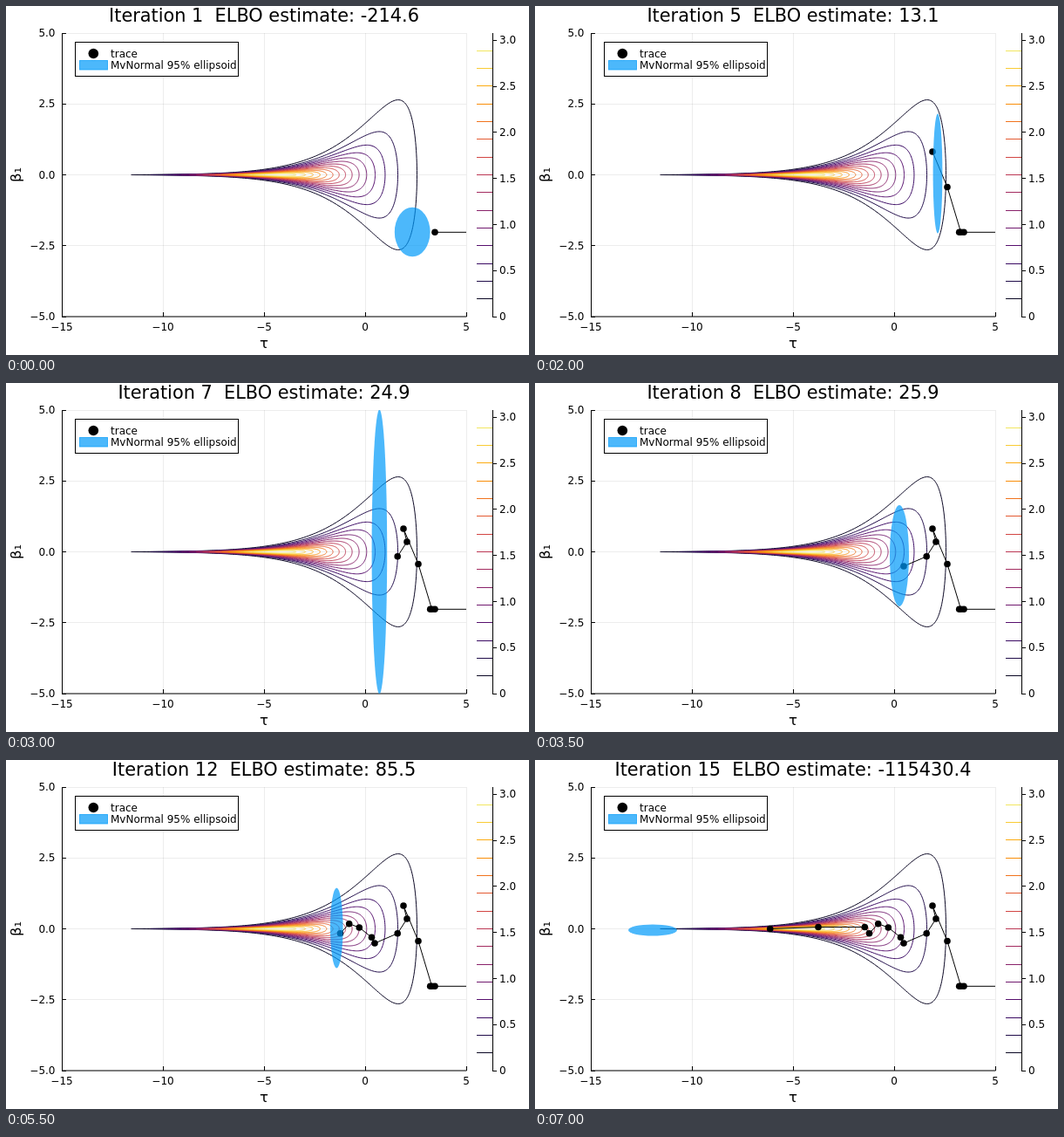
These frames come from a looping animation (600x400 px, 7.5 s). An HTML page with a canvas:

```html
<!DOCTYPE html>
<html lang="en">
<head>
<meta charset="utf-8">
<style>
  html, body { margin: 0; width: 100%; height: 100%; overflow: hidden; background: #fff; }
  canvas { display: block; width: 600px; height: 400px; }
</style>
</head>
<body>
<canvas id="stage" width="600" height="400"></canvas>
<script>
const ctx = document.getElementById('stage').getContext('2d');
const STEP = 500;
const BOX = { l: 64, t: 31, r: 528, b: 356 };
const BLUE = 'rgba(0,154,249,0.7)';
const INFERNO = ['#0b0724', '#210c4a', '#3a0963', '#57106e', '#711a6e', '#8a226a', '#a42c60',
  '#bc3754', '#d24644', '#e45a31', '#f1731d', '#f98e09', '#fcac11', '#f9cb35', '#f2e661'];

// Optimiser path; it enters from beyond the right edge.
const PATH = [[560, 259.3], [492, 259.3], [486.7, 259.3], [488.6, 259.3], [473, 207.5],
  [456, 167], [460, 182], [449.2, 198.8], [423, 210], [419.5, 203.3], [405.3, 192],
  [393.7, 187.7], [383.5, 198.7], [378.3, 191.5], [325, 191.5], [269.7, 193.5]];

// Per iteration: ELBO text, then ellipse centre and radii.
const STEPS = [
  ['-214.6', 466.2, 259, 20.4, 28.3],
  ['-246.3', 488.3, 259, 7.7, 12],
  ['-259.0', 488.8, 258.7, 7.8, 12.3],
  ['-3.18462075931e10', 456, 180, 420, 45],
  ['13.1', 462, 192, 5.4, 68.5],
  ['-18.3', 449, 199, 10, 60],
  ['24.9', 428.4, 193.5, 8.8, 163],
  ['25.9', 418, 198, 11, 58],
  ['-184273.6', 296, 178, 202, 36],
  ['23.0', 388.7, 185.6, 7.6, 69.2],
  ['62.8', 384, 194, 8, 51],
  ['85.5', 379.3, 192.5, 7.3, 46],
  ['71.3', 326, 192, 14, 38],
  ['-3.7182946150273846e127', 270, 193.5, 4000, 22.5],
  ['-115430.4', 135, 195, 28, 6.6]
];

const px = tau => 412 + tau * 23.2;
const py = beta => 193.5 - beta * 32.5;
const cbarY = v => 356 - v * 105.6;

function line(x1, y1, x2, y2, color = '#000', width = 1) {
  ctx.strokeStyle = color;
  ctx.lineWidth = width;
  ctx.beginPath();
  ctx.moveTo(x1, y1);
  ctx.lineTo(x2, y2);
  ctx.stroke();
}

function text(str, x, y, size, align = 'left') {
  ctx.font = size + 'px "DejaVu Sans", sans-serif';
  ctx.textAlign = align;
  ctx.fillStyle = '#000';
  ctx.fillText(str, x, y);
}

function dot(x, y, r) {
  ctx.fillStyle = '#000';
  ctx.beginPath();
  ctx.arc(x, y, r, 0, 2 * Math.PI);
  ctx.fill();
}

function axes() {
  const grid = 'rgba(0,0,0,0.07)';
  for (let v = -15; v <= 5; v += 5) {
    const x = px(v) + 0.5;
    line(x, BOX.t, x, BOX.b, grid);
    line(x, BOX.b, x, BOX.b - 5);
    text(String(v).replace('-', '\u2212'), px(v), 371.5, 12, 'center');
  }
  for (let v = -5; v <= 5; v += 2.5) {
    const y = Math.floor(py(v)) + 0.5;
    line(BOX.l, y, BOX.r, y, grid);
    line(BOX.l, y, BOX.l + 5, y);
    text(v.toFixed(1).replace('-', '\u2212'), 56.5, py(v) + 4.2, 12, 'right');
  }
  line(64.5, BOX.t, 64.5, BOX.b + 0.5);
  line(BOX.l, 356, BOX.r + 0.5, 356);
  text('τ', 296, 391.5, 16.5, 'center');
  ctx.save();
  ctx.translate(16.5, 193.5);
  ctx.rotate(-Math.PI / 2);
  text('β₁', 0, 0, 16.5, 'center');
  ctx.restore();
}

// Level sets of exp(-τ²/18 - τ/2 - β²/(2e^τ)), at i/16 of the peak.
function contours() {
  ctx.lineWidth = 1;
  INFERNO.forEach((color, k) => {
    const rad = Math.sqrt(18 * Math.log(16 / (k + 1)));
    ctx.strokeStyle = color;
    ctx.beginPath();
    for (let a = 0; a < 360; a++) {
      const th = a * Math.PI / 180;
      const tau = -4.5 + rad * Math.cos(th);
      ctx.lineTo(px(tau), py(Math.exp(tau / 2) * rad * Math.sin(th) / 3));
    }
    ctx.closePath();
    ctx.stroke();
  });
}

function colorbar() {
  INFERNO.forEach((color, k) => {
    const y = Math.floor(356 - (k + 1) * 325 / 16) + 0.5;
    line(540, y, 558, y, color);
  });
  line(558.5, BOX.t, 558.5, BOX.b + 0.5);
  for (let v = 0; v <= 3; v += 0.5) {
    const y = Math.floor(cbarY(v)) + 0.5;
    line(558, y, 563, y);
    text(v ? v.toFixed(1) : '0', 566, cbarY(v) + 4.2, 12);
  }
}

function trace(n) {
  ctx.strokeStyle = '#000';
  ctx.lineWidth = 1;
  ctx.beginPath();
  PATH.slice(0, n + 1).forEach(p => ctx.lineTo(...p));
  ctx.stroke();
  PATH.slice(1, n + 1).forEach(p => dot(...p, 3.8));
}

function legend() {
  ctx.fillStyle = '#fff';
  ctx.fillRect(79.5, 41.5, 187, 39);
  ctx.strokeStyle = '#000';
  ctx.lineWidth = 1;
  ctx.strokeRect(79.5, 41.5, 187, 39);
  dot(100.3, 54.5, 5.8);
  ctx.fillStyle = BLUE;
  ctx.fillRect(84.5, 62.5, 32, 10.5);
  ctx.strokeStyle = BLUE;
  ctx.strokeRect(84.5, 62.5, 32, 10.5);
  text('trace', 120, 59, 12);
  text('MvNormal 95% ellipsoid', 120, 72.3, 12);
}

function draw(n) {
  const [elbo, cx, cy, rx, ry] = STEPS[n - 1];
  ctx.fillStyle = '#fff';
  ctx.fillRect(0, 0, 600, 400);
  axes();
  ctx.save();
  ctx.beginPath();
  ctx.rect(BOX.l, BOX.t, BOX.r - BOX.l, BOX.b - BOX.t);
  ctx.clip();
  contours();
  trace(n);
  ctx.fillStyle = BLUE;
  ctx.beginPath();
  ctx.ellipse(cx, cy, rx, ry, 0, 0, 2 * Math.PI);
  ctx.fill();
  ctx.restore();
  colorbar();
  legend();
  text(`Iteration ${n}\u00a0 ELBO estimate: ${elbo}`, 296, 18, 20.85, 'center');
}

const start = performance.now();
let shown = 0;
function tick() {
  const t = performance.now() - start;
  const n = Math.floor(t / STEP) % STEPS.length + 1;
  if (n !== shown) draw(shown = n);
  requestAnimationFrame(tick);
}
tick();
</script>
</body>
</html>
```
